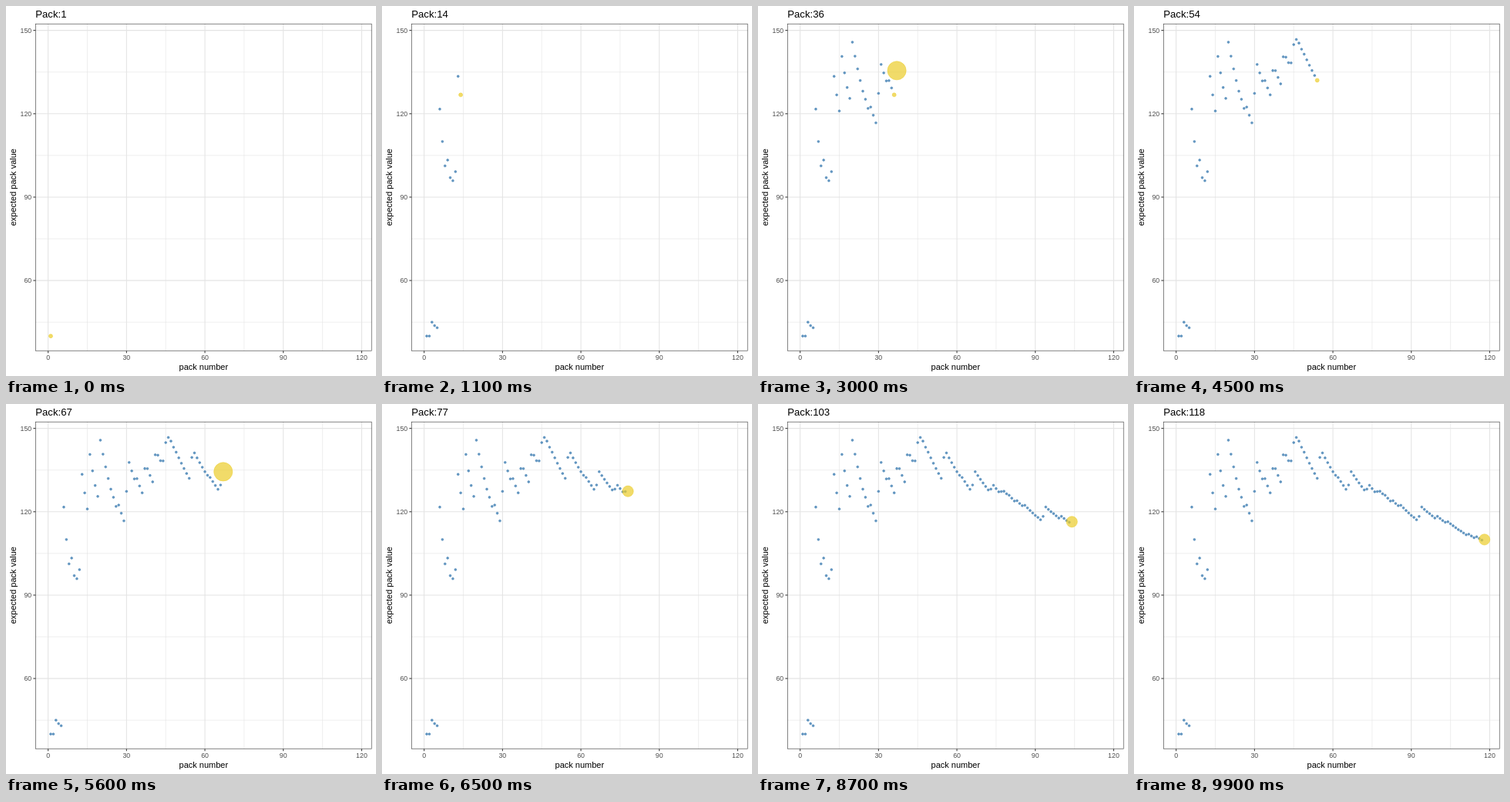
Write an HTML page that moves like this. It is 480 px wide and 480 px high and loops after 10000 ms.

```html
<!DOCTYPE html>
<html lang="en">
<head>
<meta charset="utf-8">
<title>Expected pack value</title>
<style>
  html, body { margin: 0; width: 100%; height: 100%; overflow: hidden; background: #fff; }
  svg { display: block; width: 100vw; height: 100vh; }
  text { font-family: "Liberation Sans", Arial, sans-serif; font-size: 11px; }
  .title { font-size: 13.2px; }
  .tick-label { font-size: 8.8px; fill: #4d4d4d; }
  .major { stroke: #e4e4e4; stroke-width: 1.07; }
  .minor { stroke: #dedede; stroke-width: .53; }
  .tick { stroke: #333; stroke-width: 1.07; }
  .border { stroke: #333; stroke-width: .6; fill: none; }
  .past, .current { stroke-width: .71; }
  .past { fill: #4682b4; stroke: #4682b4; fill-opacity: .82; stroke-opacity: .82; }
  .current { fill: #ebcc2a; stroke: #ebcc2a; fill-opacity: .7; stroke-opacity: .7; }
</style>
</head>
<body>
<svg id="stage" viewBox="0 0 480 480"></svg>
<script>
const FRAMES = 100, FRAME_MS = 100, PACKS = 118;
const PANEL = { left: 38.2, right: 474.5, top: 22.9, bottom: 447.5 };

// Packs holding special cards; a pack named twice holds two of them.
const BASE = 40, RARE = 15, EPIC = 95, LEGENDARY = 395;
const legendaries = [6, 13, 16, 20, 30, 31, 37, 41, 45, 55, 67, 94];
const epics = [6, 9, 12, 13, 20, 27, 34, 38, 41, 42, 44, 46, 46, 55, 56, 56,
  66, 66, 73, 74, 74, 77, 78, 83, 86, 93, 93, 100, 104, 112, 115, 118];
const rareHauls = [11, 47, 62, 80, 100];

const amount = (list, n) => list.filter(pack => pack === n).length;

// Extra rares: an uneven start, then one in every sixth pack.
function extraRares(n) {
  const steady = n < 12 ? (n % 3 ? 0 : n < 6 ? 1 : -1) : Number(n % 6 === 1);
  return steady + 3 * amount(rareHauls, n);
}
const packValue = n => BASE + RARE * extraRares(n)
  + EPIC * amount(epics, n) + LEGENDARY * amount(legendaries, n);

// Linear scale with a 5% margin on both ends of the data range.
function scale(min, max, from, to) {
  const pad = (max - min) * 0.05;
  const slope = (to - from) / (max - min + 2 * pad);
  return v => from + (v - min + pad) * slope;
}
const toX = scale(1, PACKS, PANEL.left, PANEL.right);
const toY = scale(BASE, 147.07, PANEL.bottom, PANEL.top);

function radius(value) {
  const share = (value - BASE) / (RARE + EPIC + LEGENDARY);
  return 0.354 + 1.067 * (2 + 10 * Math.sqrt(share));
}

const stage = document.getElementById("stage");
function add(tag, attrs, content = "", parent = stage) {
  const node = document.createElementNS("http://www.w3.org/2000/svg", tag);
  for (const key in attrs) node.setAttribute(key, attrs[key]);
  node.textContent = content;
  return parent.appendChild(node);
}
const line = (cls, x1, y1, x2, y2) => add("line", { class: cls, x1, y1, x2, y2 });
const column = (cls, v) => line(cls, toX(v), PANEL.top, toX(v), PANEL.bottom);
const row = (cls, v) => line(cls, PANEL.left, toY(v), PANEL.right, toY(v));

for (let v = 15; v < 120; v += 30) column("minor", v);
for (let v = 45; v < 150; v += 30) row("minor", v);
for (let v = 0; v <= 120; v += 30) column("major", v);
for (let v = 60; v <= 150; v += 30) row("major", v);

const pastLayer = add("g", {}), currentLayer = add("g", {});

const inset = 0.3;
add("rect", {
  class: "border", x: PANEL.left + inset, y: PANEL.top + inset,
  width: PANEL.right - PANEL.left - 2 * inset,
  height: PANEL.bottom - PANEL.top - 2 * inset
});
for (let v = 0; v <= 120; v += 30) {
  line("tick", toX(v), PANEL.bottom, toX(v), PANEL.bottom + 2.75);
  add("text", { class: "tick-label", x: toX(v), y: 458.8, "text-anchor": "middle" }, v);
}
for (let v = 60; v <= 150; v += 30) {
  line("tick", PANEL.left - 2.75, toY(v), PANEL.left, toY(v));
  add("text", { class: "tick-label", x: 33.25, y: toY(v) + 3.15, "text-anchor": "end" }, v);
}
const midX = (PANEL.left + PANEL.right) / 2, midY = (PANEL.top + PANEL.bottom) / 2;
add("text", { x: midX, y: 471.8, "text-anchor": "middle" }, "pack number");
add("text", { transform: `translate(13.4 ${midY}) rotate(-90)`, "text-anchor": "middle" },
  "expected pack value");
const title = add("text", { class: "title", x: PANEL.left, y: 15 });

// Each point sits at the running mean of all packs opened so far.
const points = [];
for (let n = 1, sum = 0; n <= PACKS; n++) {
  const value = packValue(n);
  sum += value;
  const cx = toX(n), cy = toY(sum / n);
  points.push({
    frame: Math.round((n - 1) * (FRAMES - 1) / (PACKS - 1)),
    past: add("circle", { class: "past", cx, cy, r: 1.42 }, "", pastLayer),
    current: add("circle", { class: "current", cx, cy, r: radius(value) }, "", currentLayer)
  });
}

const show = (node, visible) => node.setAttribute("display", visible ? "inline" : "none");

function render(ms) {
  const frame = Math.floor(ms / FRAME_MS) % FRAMES;
  title.textContent = "Pack:" + (1 + Math.floor(frame * (PACKS - 1) / (FRAMES - 1)));
  for (const p of points) {
    show(p.past, p.frame < frame);
    show(p.current, p.frame === frame);
  }
}

const start = performance.now();
function tick() {
  render(Math.max(0, performance.now() - start));
  requestAnimationFrame(tick);
}
tick();
</script>
</body>
</html>
```
